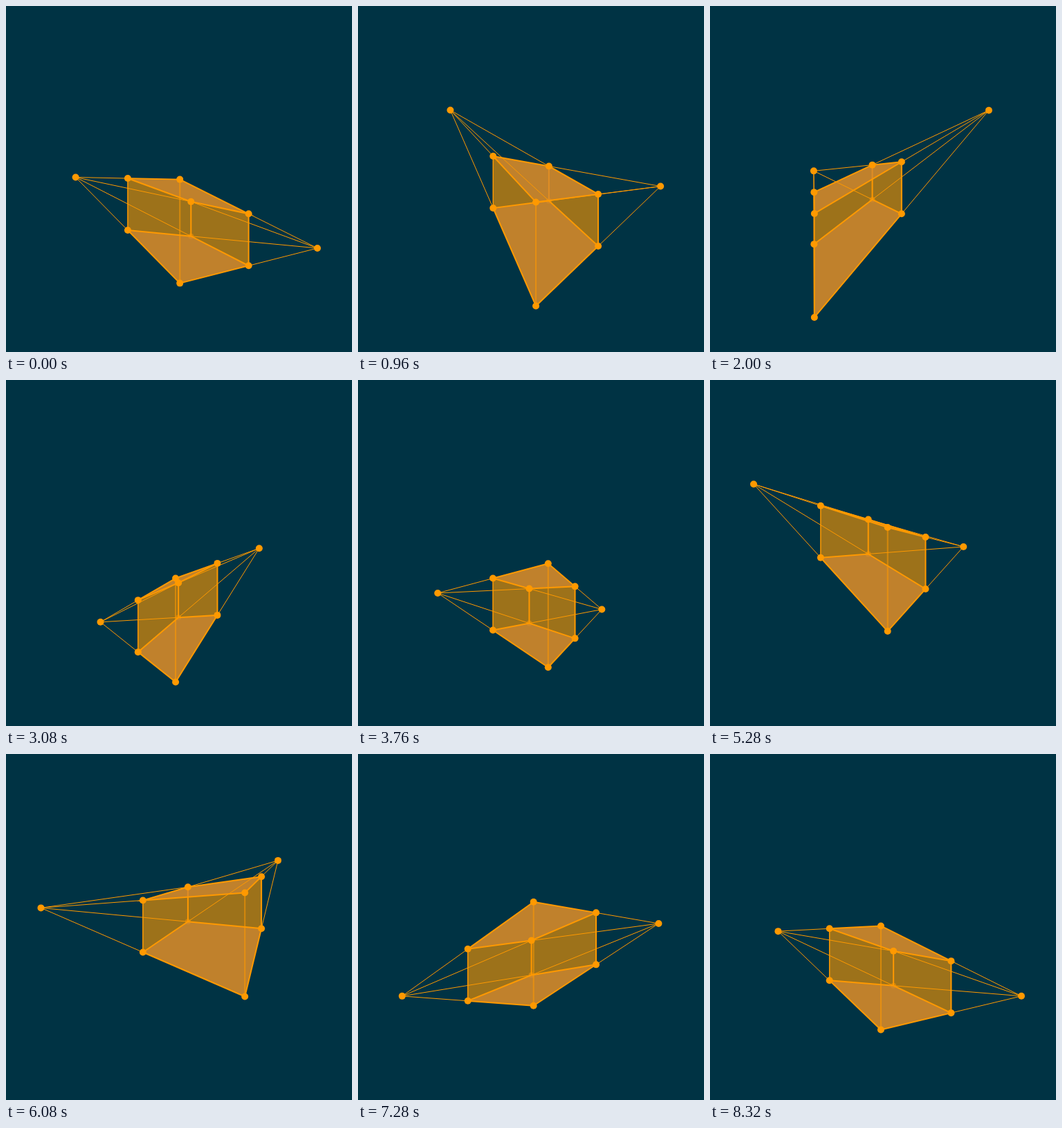
Recreate the animation shown at these times as an HTML page with a canvas. Size 500 by 500 pixels, loop 8.36 s.

```html
<!DOCTYPE html>
<html>
<head>
<meta charset="utf-8">
<title>Two-point perspective box</title>
<style>
  html, body { margin: 0; width: 100%; height: 100%; overflow: hidden; background: #034; }
  canvas { display: block; }
</style>
</head>
<body>
<canvas id="stage" width="500" height="500"></canvas>
<script>
const ctx = document.getElementById('stage').getContext('2d');
const ORANGE = '#f90', WALL = 'rgba(255,153,0,.38)', CAP = 'rgba(217,139,45,.8)';
const LOOP = 8360, STEP = 40;
const { sin, cos, PI } = Math;

const mean = (...pts) => [0, 1].map(i => pts.reduce((sum, p) => sum + p[i], 0) / pts.length);
const down = ([x, y], h) => [x, y + h];

function trace(pts) {
  ctx.beginPath();
  pts.forEach(p => ctx.lineTo(...p));
}

function fill(color, ...pts) {
  trace(pts);
  ctx.fillStyle = color;
  ctx.fill();
}

function line(width, alpha, ...pts) {
  trace(pts);
  ctx.globalAlpha = alpha;
  ctx.lineWidth = width;
  ctx.strokeStyle = ORANGE;
  ctx.stroke();
  ctx.globalAlpha = 1;
}

function dot([x, y], r = 5, alpha = 1) {
  ctx.globalAlpha = alpha;
  ctx.beginPath();
  ctx.arc(x, y, r, 0, 2 * PI);
  ctx.fillStyle = ORANGE;
  ctx.fill();
  ctx.globalAlpha = 1;
}

function draw(a) {
  ctx.fillStyle = '#034';
  ctx.fillRect(0, 0, 500, 500);

  // Two vanishing points and the near edge determine the whole box.
  const va = [100 + 50 * sin(a), 250 - 100 * sin(2 * a)];
  const vb = [400 + 50 * cos(a), 250 + 100 * cos(2 * a)];
  const near = [250 + 100 * sin(a) * cos(2 * a), 250 + 50 * sin(a)];
  const left = mean(va, near), right = mean(vb, near), far = mean(va, vb, near);
  const top = [near, left, far, right];
  const base = [down(near, 150), down(left, 75), down(far, 50), down(right, 75)];

  line(2, 1, top[2], base[2]);
  dot(base[2], 4, .5);
  for (let i = 0; i < 4; i++) {
    const j = (i + 1) % 4;
    fill(WALL, top[i], top[j], base[j], base[i]);
  }
  fill(CAP, ...base);
  fill(CAP, ...top);

  for (const ring of [top, base]) {
    line(1, 1, va, ring[1]);
    line(1, 1, va, ring[2]);
    line(1, 1, vb, ring[3]);
    line(1, 1, vb, ring[2]);
    line(2, 1, ...ring, ring[0]);
  }
  line(2, .6, top[0], base[0]);
  line(1.5, 1, top[1], base[1]);
  line(2, 1, top[3], base[3]);

  [va, vb, ...top, base[0], base[1], base[3]].forEach(p => dot(p));
}

function tick() {
  const step = Math.floor(performance.now() % LOOP / STEP);
  draw(.0125 + .03 * step);
  requestAnimationFrame(tick);
}
tick();
</script>
</body>
</html>
```
